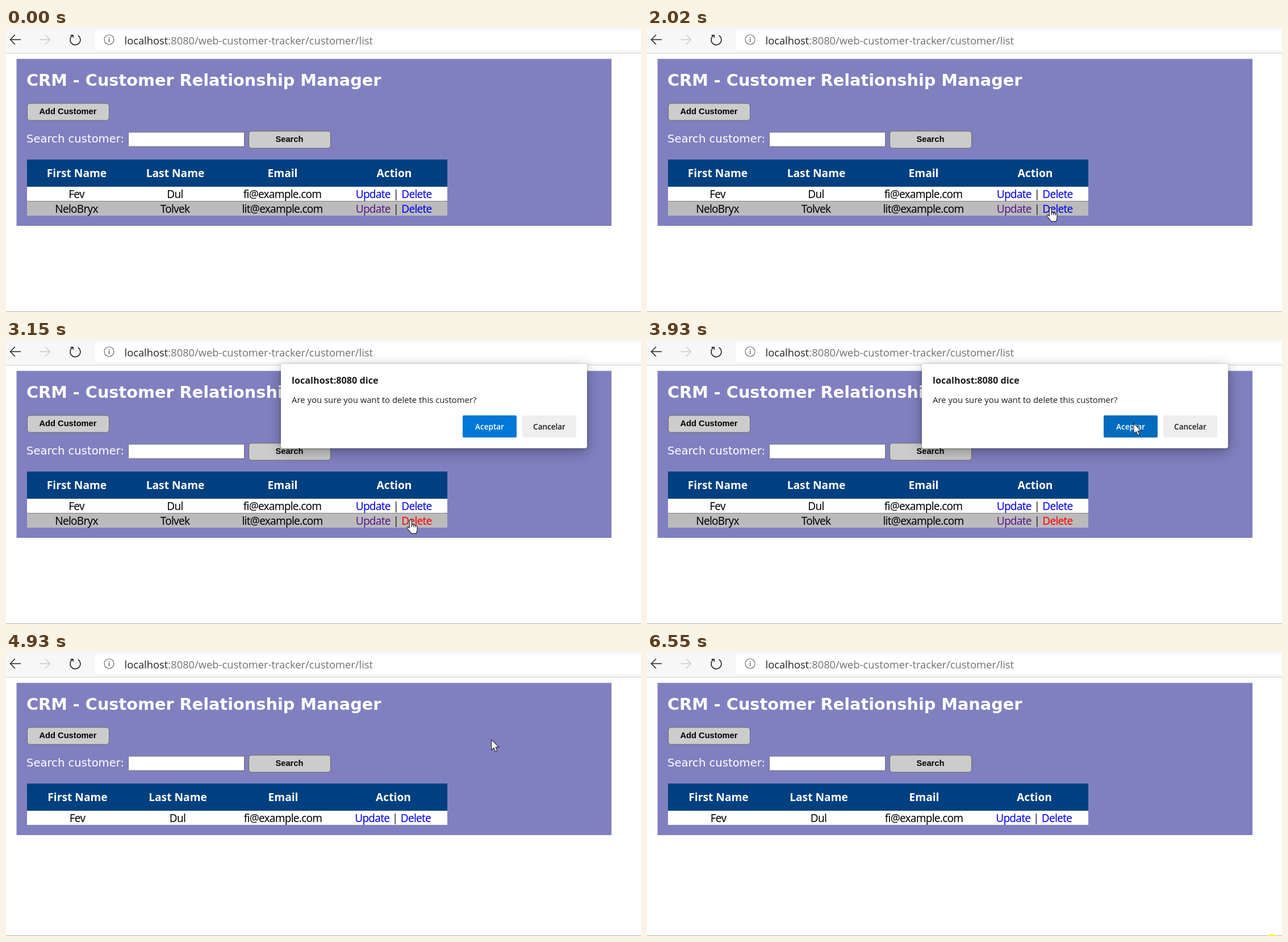
Animation, 1118 px wide and 501 px high, one loop 6.76 s. Source, as an HTML page:

```html
<!DOCTYPE html>
<html lang="en">
<head>
<meta charset="utf-8">
<title>Customer list</title>
<style>
html, body { margin: 0; width: 100%; height: 100%; overflow: hidden; background: #fefefe; }
svg { position: absolute; left: 0; top: 0; overflow: visible; }
#stage { position: relative; width: 1118px; height: 501px; overflow: hidden; }
text { white-space: pre; }
.url { font: 18.33px "Open Sans", sans-serif; }
.title { font: bold 28.75px "DejaVu Sans", sans-serif; fill: #fff; }
.label { font: 19.6px "DejaVu Sans", sans-serif; fill: #fff; }
.btn { font: bold 14.67px "Liberation Sans", sans-serif; }
.head { font: bold 19.2px "Noto Sans", sans-serif; fill: #fff; }
.cell { font: 19px "Noto Sans", sans-serif; letter-spacing: -.75px; }
.mid { text-anchor: middle; }
#dialog { position: absolute; left: 484px; top: 42px; width: 539px; height: 149px; background: #fff;
  border-radius: 4px; box-shadow: 0 6px 24px rgba(0,0,0,.32), 0 1px 4px rgba(0,0,0,.22); transform-origin: 50% 0; }
.dtitle { font: bold 16.2px "Open Sans", sans-serif; fill: #1b1b1b; }
.dmsg { font: 14.9px "Open Sans", sans-serif; fill: #1b1b1b; }
.dbtn { font: 600 13.5px "Open Sans", sans-serif; }
</style>
</head>
<body>
<div id="stage">
  <svg id="page" width="1118" height="501"></svg>
  <div id="dialog"><svg width="539" height="149">
    <text class="dtitle" x="19" y="34.5">localhost:8080 dice</text>
    <text class="dmsg" x="19" y="68.5">Are you sure you want to delete this customer?</text>
    <rect id="accept" x="320" y="91" width="95" height="39" rx="2"/>
    <rect x="425" y="91" width="95" height="39" rx="2" fill="#eee"/>
    <text class="dbtn mid" x="367.5" y="115.5" fill="#fff">Aceptar</text>
    <text class="dbtn mid" x="472.5" y="115.5" fill="#1b1b1b">Cancelar</text>
  </svg></div>
  <svg width="1118" height="501">
    <ellipse id="glow" cx="1100" cy="503" rx="9" ry="5" fill="#f4f04e"/>
    <g id="cursor" stroke="#222" fill="#fff" stroke-linejoin="round">
      <path id="arrow" d="M0 0V17.2L4 13.4L6.6 19.5L9.3 18.4L6.7 12.3H12Z" transform="scale(1.08)" stroke-width="1"/>
      <path id="hand" transform="scale(1.08) translate(-7.5 0)" stroke-width="1.1"
        d="M5 2a1.8 1.8 0 0 1 3.6 0V8.5c.6-1.2 3-1 3.2.6c.9-1.1 3-.6 3.1.8c1-.8 2.8-.2 2.8 1.4V17c0 2-1.5 3.5-1.7 5.5H8C7 20 4 17.5 1.5 14.5C0 12.5 2 11 3.5 12.3L5 13.8ZM8.6 8.5V12M11.8 9.2V12.2M14.9 10V12.5"/>
    </g>
  </svg>
</div>
<script>
const LOOP = 6760;
const $ = id => document.getElementById(id);
const rect = (x, y, w, h, fill, more = '') =>
  `<rect x="${x}" y="${y}" width="${w}" height="${h}" fill="${fill}" ${more}/>`;
const text = (cls, x, y, s, more = '') => `<text class="${cls}" x="${x}" y="${y}" ${more}>${s}</text>`;
const line = (d, color, more = '') => `<path d="${d}" fill="none" stroke="${color}" stroke-width="1.5" ${more}/>`;

function toolbar() {
  const back = 'M26 20.5H7.5M16 12L7.5 20.5L16 29', forth = 'M59 20.5H77.5M69 12L77.5 20.5L69 29';
  return rect(0, 0, 1118, 44, '#f7f7f7') + rect(0, 44, 1118, 1, '#d2d2d2') +
    rect(155, 2, 980, 39, '#fff', 'rx="5" stroke="#eee"') +
    line(back, '#222') + line(forth, '#ccc') +
    `<g id="reload">${line('M117.2 13.2A9 9 0 1 0 126.6 13.1M113.6 12.7H118.2V17.3', '#222')}</g>` +
    line('M115 13.5L129 27.5M129 13.5L115 27.5', '#222', 'id="stop"') +
    '<circle cx="181.5" cy="20.5" r="8.5" fill="none" stroke="#666" stroke-width="1.2"/>' +
    rect(180.8, 19, 1.5, 6, '#666') + rect(180.8, 16, 1.5, 1.7, '#666') +
    text('url', 208.5, 28.5, '<tspan fill="#222">localhost</tspan><tspan fill="#707070">:8080/web-customer-tracker/customer/list</tspan>');
}

function button(x, y, label) {
  return rect(x + .5, y + .5, 144, 30, '#ccc', 'rx="5" stroke="#666"') + text('btn mid', x + 72, y + 19.5, label);
}

// cols: centres of the four columns
function table(cols, rows) {
  const heads = ['First Name', 'Last Name', 'Email', 'Action'];
  let out = rect(37, 232, 740, 48, '#004080');
  heads.forEach((h, i) => out += text('head mid', cols[i], 263, h));
  rows.forEach((row, r) => {
    const y = 280 + 26 * r, base = y + 20, ax = cols[3] - 67.5;
    out += rect(37, y, 740, 25, r ? '#bbb' : '#fff');
    if (r) out += rect(37, y - 1, 740, 1, '#808080');
    row.forEach((s, i) => out += text('cell mid', cols[i] - .5, base, s));
    out += text('cell', ax - .2, base, 'Update', `fill="${r ? '#551a8b' : '#00e'}"`) +
      rect(ax + 70, y + 5, 1.4, 19, '#222') +
      text('cell', ax + 80.3, base, 'Delete', `fill="#00e" ${r ? 'id="del"' : ''}`);
  });
  return out;
}

const first = ['Fev', 'Dul', 'fi@example.com'];
const second = ['NeloBryx', 'Tolvek', 'lit@example.com'];
$('page').innerHTML = rect(0, 0, 1118, 501, '#fefefe') + toolbar() +
  rect(18.5, 54.5, 1047.5, 294.5, '#8080c0', 'id="panel"') +
  text('title', 36, 102, 'CRM - Customer Relationship Manager') +
  button(37, 132.5, 'Add Customer') +
  text('label', 36, 202, 'Search customer:') +
  rect(215.5, 184, 204, 25, '#fff', 'stroke="#767676"') +
  button(427, 181.5, 'Search') +
  `<g id="before">${table([124.5, 298, 487, 683.5], [first, second])}</g>` +
  `<g id="after">${table([126, 302.5, 488, 682], [first])}</g>` +
  rect(0, 500, 1118, 1, '#b4b4b4');

const clamp = v => Math.min(1, Math.max(0, v));
const span = (t, a, b) => clamp((t - a) / (b - a));
const smooth = p => p * p * (3 - 2 * p);
const easeOut = p => 1 - (1 - p) ** 2;
const linear = p => p;

// start, end, from, bend, to, easing
const moves = [
  [880, 1570, [362, 501], [475, 214], [583, 346], linear],
  [1570, 2020, [583, 346], [650, 356], [711, 317], easeOut],
  [2300, 2310, [711, 317], [711, 317], [712, 317], linear],
  [3120, 3150, [712, 317], [712, 317], [713, 317], linear],
  [3150, 3700, [713, 317], [770, 215], [855, 141], smooth],
  [3810, 3930, [855, 141], [855, 145], [857, 147], smooth],
  [4520, 4580, [857, 147], [856, 151], [854, 154], smooth],
  [4910, 5590, [854, 154], [985, 265], [1071, 417], smooth],
  [5590, 5970, [1071, 417], [1088, 450], [1108, 503], linear]
];

function cursorAt(t) {
  let m = moves[0];
  for (const next of moves) if (t >= next[0]) m = next;
  const [a, b, p, c, q, ease] = m, u = ease(span(t, a, b)), v = 1 - u;
  return [0, 1].map(i => v * v * p[i] + 2 * u * v * c[i] + u * u * q[i]);
}

const show = (id, on) => $(id).style.display = on ? '' : 'none';

function drawDialog(t) {
  let tilt, alpha;
  if (t < 4430) {
    alpha = smooth(span(t, 2700, 2920));
    tilt = 1 - alpha;
  } else {
    const p = span(t, 4430, 4580);
    tilt = p ** .58;
    alpha = 1 - p ** 1.42;
  }
  const box = $('dialog').style;
  show('dialog', alpha > 0);
  box.opacity = alpha;
  box.transform = tilt ? `translateY(${-21.5 * tilt}px) perspective(1000px) rotateX(${6 * tilt}deg)` : 'none';
  const pressed = t >= 4220 && t < 4370, hover = t >= 3620 && t < 4220;
  $('accept').setAttribute('fill', pressed ? '#005a9e' : hover ? '#006cbe' : '#0078d7');
}

function draw(t) {
  const deleted = t >= 4575, loading = t >= 4400 && !deleted;
  show('before', !deleted);
  show('after', deleted);
  show('reload', !loading);
  show('stop', loading);
  $('panel').setAttribute('height', deleted ? 268.5 : 294.5);
  $('del').setAttribute('fill', t >= 2510 && t < 4370 ? '#f00' : '#00e');
  drawDialog(t);

  const [x, y] = cursorAt(t);
  const onLink = y > 308 && y < 331 && (x > 616 && x < 677 || x > 697 && x < 751);
  const hand = onLink && t < 3180;
  show('cursor', t >= 910 && t < 5960);
  show('hand', hand);
  show('arrow', !hand);
  $('cursor').setAttribute('transform', `translate(${x} ${y})`);
  show('glow', t >= 6550);
}

const start = performance.now();
function tick() {
  draw((performance.now() - start) % LOOP);
  requestAnimationFrame(tick);
}
tick();
</script>
</body>
</html>
```
